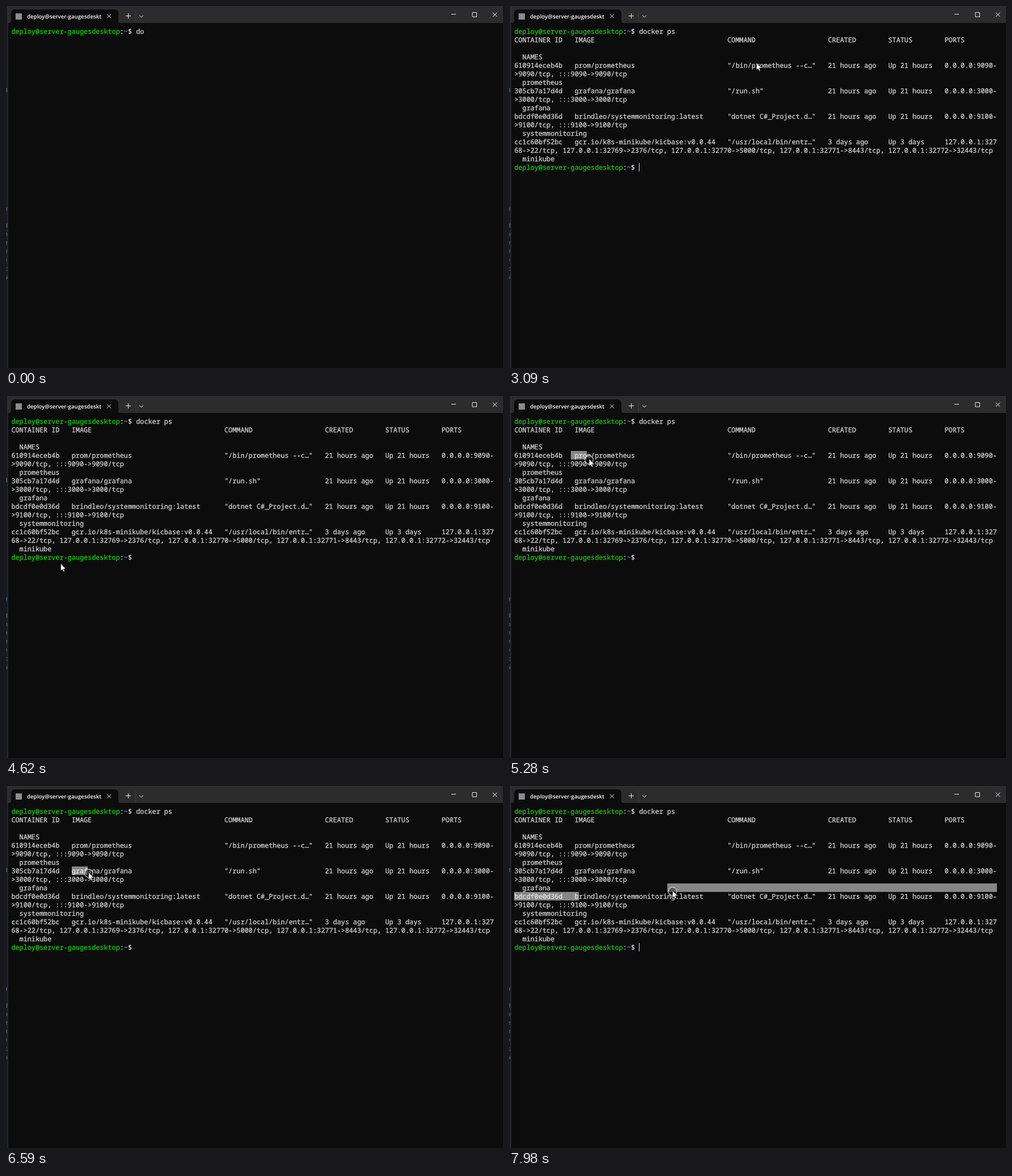
Recreate the animation shown at these times as an HTML page. Size 876 px wide and 639 px high, loop 8 s.

```html
<!DOCTYPE html>
<html lang="en">
<head>
<meta charset="utf-8">
<title>Terminal</title>
<style>
  html, body { margin: 0; width: 100%; height: 100%; overflow: hidden; background: #0c0c0c; }
  svg { display: block; }
  text { white-space: pre; text-rendering: geometricPrecision; }
  #screen text { font: 500 11.82px "Noto Sans Mono", monospace; fill: #ccc; stroke: #ccc; stroke-width: .35; }
  #screen .host { fill: #16c60c; stroke: #16c60c; }
  #screen .path { fill: #3b78ff; stroke: #3b78ff; }
  #behind text { font: 10px "Noto Sans Mono", monospace; fill: #777; }
  .title { font: 600 9.7px "Open Sans", sans-serif; fill: #fff; }
  .icons { fill: none; stroke: #eee; stroke-width: 1; }
</style>
</head>
<body>
<svg width="876" height="639" viewBox="0 0 876 639">
  <rect width="876" height="639" fill="#0c0c0c"/>
  <rect width="876" height="30" fill="#2c2c2c"/>
  <g id="behind">
    <rect width="3" height="639" fill="#171b24"/>
    <svg width="3" height="639"></svg>
    <path d="M3 0V639" stroke="#383b42"/>
  </g>
  <path d="M5 30Q9 30 9 26V13Q9 6 16 6H191Q198 6 198 13V26Q198 30 202 30Z" fill="#0c0c0c"/>
  <rect x="17" y="13" width="11" height="11" fill="#8a8d90"/>
  <text class="title" x="37" y="22">deploy@server-gaugesdeskt</text>
  <path d="M228.5 9V28" stroke="#3c3c3c"/>
  <path class="icons" d="M178 14.5l7 7m0-7l-7 7M211 17.5h9m-4.5-4.5v9M235 16.5l3.5 3.5l3.5-3.5
    M785 14.5h8M822 11.5h7.5v7.5h-7.5zM858 11.5l7.5 7.5m0-7.5l-7.5 7.5"/>
  <g id="screen"></g>
  <path id="selection" fill="#fff" fill-opacity=".5"/>
  <rect id="caret" width="1" height="15" fill="#e6e6e6"/>
  <g id="mouse">
    <circle id="press" cy="1.5" r="7.3" fill="#000" fill-opacity=".35" stroke="#ddd" stroke-width="1.1"/>
    <path d="M0 0V12.8L2.9 10.2L4.9 14.6L6.9 13.7L5 9.4H8.8Z" fill="#fff" stroke="#000" stroke-width=".6"/>
  </g>
</svg>
<script>
const LOOP = 8000, LEFT = 9.4, TOP = 37, CELL = 7.092, ROW = 15, BASELINE = 11.6, COLS = 120;
const $ = id => document.getElementById(id);

function addText(parent, x, y, content, fill) {
  const node = document.createElementNS("http://www.w3.org/2000/svg", "text");
  node.setAttribute("x", x);
  node.setAttribute("y", y);
  if (fill) node.style.fill = fill;
  node.innerHTML = content;
  parent.append(node);
  return node;
}

const rowText = (row, content, col = 0) =>
  addText($("screen"), LEFT + col * CELL, TOP + BASELINE + row * ROW, content);
const prompt = '<tspan class="host">deploy@server-gaugesdesktop</tspan>:<tspan class="path">~</tspan>$ ';
const PROMPT_COLS = 31;
const record = (id, image, command, created, status, ports) =>
  id.padEnd(15) + image.padEnd(38) + command.padEnd(25) + created.padEnd(15) + status.padEnd(14) + ports;

const output = [
  record("CONTAINER ID", "IMAGE", "COMMAND", "CREATED", "STATUS", "PORTS"),
  "",
  "  NAMES",
  record("610914eceb4b", "prom/prometheus", '"/bin/prometheus --c…"', "21 hours ago", "Up 21 hours", "0.0.0.0:9090-"),
  ">9090/tcp, :::9090->9090/tcp",
  "  prometheus",
  record("305cb7a17d4d", "grafana/grafana", '"/run.sh"', "21 hours ago", "Up 21 hours", "0.0.0.0:3000-"),
  ">3000/tcp, :::3000->3000/tcp",
  "  grafana",
  record("bdcdf0e0d36d", "brindleo/systemmonitoring:latest", '"dotnet C#_Project.d…"', "21 hours ago", "Up 21 hours", "0.0.0.0:9100-"),
  ">9100/tcp, :::9100->9100/tcp",
  "  systemmonitoring",
  record("cc1c60bf52bc", "gcr.io/k8s-minikube/kicbase:v0.0.44", '"/usr/local/bin/entr…"', "3 days ago", "Up 3 days", "127.0.0.1:327"),
  "68->22/tcp, 127.0.0.1:32769->2376/tcp, 127.0.0.1:32770->5000/tcp, 127.0.0.1:32771->8443/tcp, 127.0.0.1:32772->32443/tcp",
  "  minikube",
];

// Sliver of the window behind, visible at the left edge
const sliver = document.querySelector("#behind svg");
addText(sliver, -3, 152, "3");
addText(sliver, -3, 362, "#", "#3f6fc0");
[..."dbee}tu"].forEach((letter, i) => addText(sliver, -3, 391 + i * 15.1, letter));

rowText(0, prompt);
const commandLine = rowText(0, "", PROMPT_COLS);
const outputRows = output.map((line, i) => rowText(i + 1, line.replace(/>/g, "&gt;")));
const nextPrompt = rowText(16, prompt);

const command = "docker ps";
const keyTimes = [130, 220, 300, 390, 650, 1170, 1230];
const ENTER = 1600, PRINT = 1750, READY = 1780, BLINK_FROM = 2120, BLINK = 511;

// Mouse path: time, x, y
const path = [
  [2850, 441, 10], [3000, 440, 70], [3240, 430, 150], [3490, 430, 150],
  [3650, 320, 125], [3800, 170, 105], [4020, 6, 127], [4290, 33, 210],
  [4550, 90, 351], [4880, 120, 94], [5070, 112, 106], [5220, 112, 106],
  [5280, 141, 111], [5480, 182, 115], [5700, 212, 110], [6020, 222, 108],
  [6400, 118, 150], [6450, 118, 151], [6590, 145.5, 152.5], [6960, 222, 154],
  [7460, 118.5, 193.5], [7750, 118.5, 193.5], [7980, 287.5, 184.5], [8000, 302, 183.5],
];
const drags = [
  { from: 5220, to: 6020, col: 14, row: 4 },
  { from: 6450, to: 6980, col: 15, row: 7 },
  { from: 7750, to: 8001, col: 16, row: 10 },
];

function mouseAt(t) {
  const i = path.findIndex(p => p[0] >= t);
  if (i < 1) return path[0].slice(1);
  const [t0, x0, y0] = path[i - 1], [t1, x1, y1] = path[i];
  const k = (t - t0) / (t1 - t0);
  return [x0 + (x1 - x0) * k, y0 + (y1 - y0) * k];
}

function selectionPath(t) {
  const drag = drags.filter(d => t > d.from + 15).pop();
  if (!drag) return "";
  const [x, y] = mouseAt(Math.min(t, drag.to));
  const anchor = drag.row * COLS + drag.col;
  const head = Math.floor((y - TOP) / ROW) * COLS + Math.floor((x - LEFT) / CELL);
  const first = head < anchor ? head - 1 : anchor, last = Math.max(head, anchor);
  let d = "";
  for (let cell = first; cell < last;) {
    const row = Math.floor(cell / COLS), end = Math.min(last, (row + 1) * COLS);
    const edge = c => Math.round(LEFT + (c - row * COLS) * CELL);
    d += `M${edge(cell)} ${TOP + row * ROW}H${edge(end)}v${ROW}H${edge(cell)}z`;
    cell = end;
  }
  return d;
}

function show(node, visible) {
  node.style.display = visible ? "" : "none";
}

function draw(t) {
  const typed = 2 + keyTimes.filter(k => t >= k).length;
  commandLine.textContent = command.slice(0, typed);
  outputRows.forEach(row => show(row, t >= PRINT));
  show(nextPrompt, t >= READY);

  const [col, row] = t < ENTER ? [PROMPT_COLS + typed, 0]
    : t < PRINT ? [0, 1] : t < READY ? [0, 16] : [PROMPT_COLS, 16];
  $("caret").setAttribute("x", Math.floor(LEFT + col * CELL));
  $("caret").setAttribute("y", TOP + row * ROW);
  show($("caret"), t >= keyTimes[0] && (t < BLINK_FROM || Math.floor((t - BLINK_FROM) / BLINK) % 2));

  $("selection").setAttribute("d", selectionPath(t));
  show($("mouse"), t >= path[0][0]);
  $("mouse").setAttribute("transform", `translate(${mouseAt(t)})`);
  show($("press"), drags.some(d => t >= d.from && t < d.to));
}

function frame() {
  draw(performance.now() % LOOP);
  requestAnimationFrame(frame);
}
frame();
</script>
</body>
</html>
```
